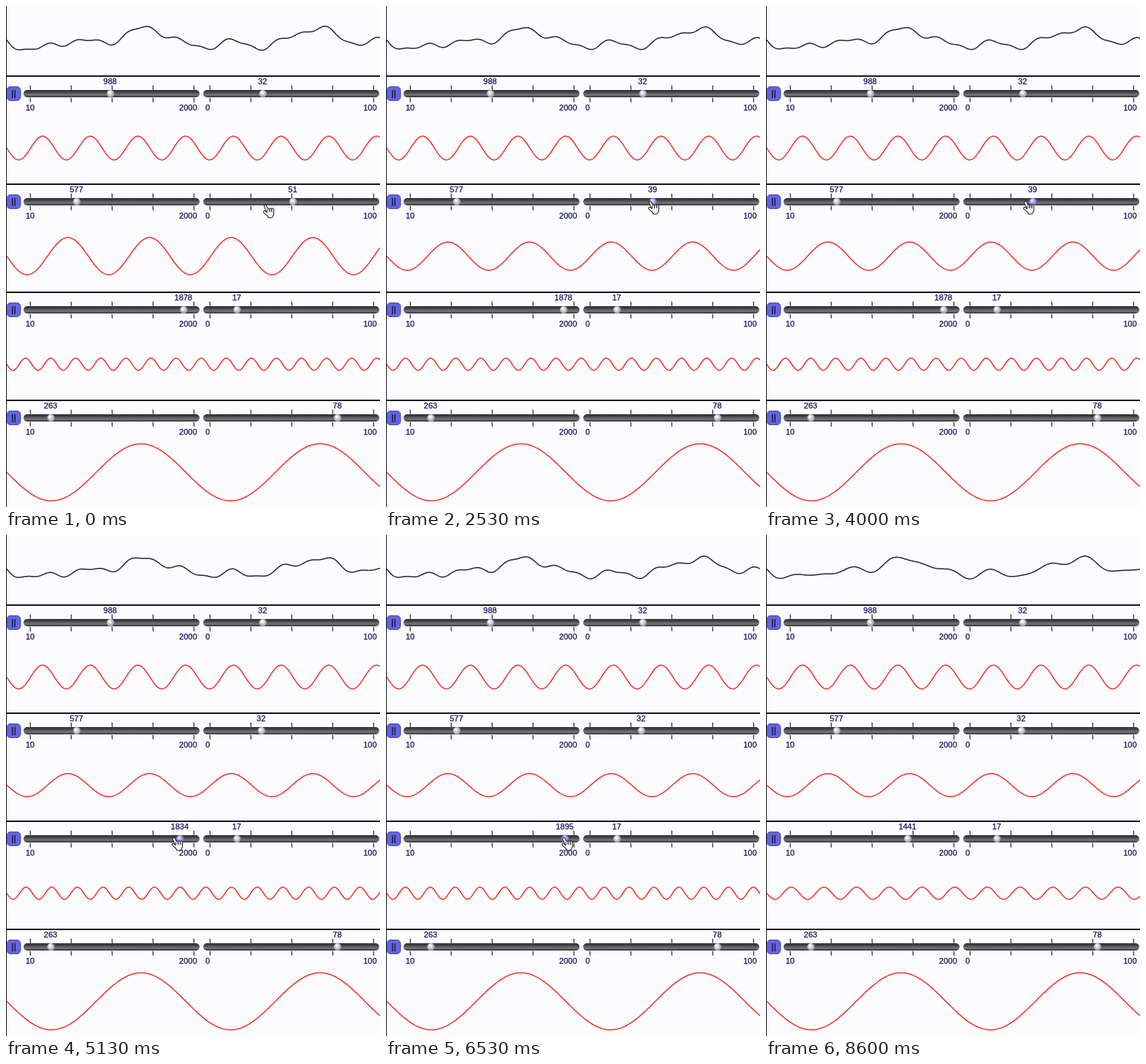
Recreate the animation shown at these times as an HTML page with a canvas. Size 512 by 686 pixels, loop 8.67 s.

```html
<!DOCTYPE html>
<html lang="en">
<head>
<meta charset="utf-8">
<title>Adding sine waves</title>
<style>
  html, body { margin: 0; width: 100%; height: 100%; overflow: hidden; background: #fcfcff; }
  canvas { display: block; width: 512px; height: 686px; }
</style>
</head>
<body>
<canvas id="stage" width="512" height="686"></canvas>
<script>
const ctx = document.getElementById('stage').getContext('2d');
const LOOP = 8670, FRAMES = 130;
const ROW_HEIGHT = 148, STEPS = 228, TRACK = 224;
const LEFT = 33, RIGHT = 279;
const KNOB_LAG = 110;
const INK = '#141418', LABEL = '#101058', WAVE = '#f03028';

const mix = (a, b, u) => a + (b - a) * u;

function ease(t, from, to) {
  const u = Math.min(1, Math.max(0, (t - from) / (to - from)));
  return u * u * (3 - 2 * u);
}

// Eased motion through turning points [time, step]
const swing = (t, ...points) => points.reduce((value, [time, next], i) =>
  i ? mix(value, next, ease(t, points[i - 1][0], time)) : next, 0);

const draggedAmplitude = t => swing(t, [1720, 116], [2900, 80], [3525, 130], [4250, 72]);
const draggedFrequency = t => swing(t, [5000, 214], [5450, 190], [6500, 216], [7830, 164]);
const knobX = (start, step) => start + step * TRACK / STEPS;

function text(label, x, y, align = 'left') {
  ctx.font = '11px "Liberation Sans", Arial, sans-serif';
  ctx.textAlign = align;
  ctx.fillStyle = ctx.strokeStyle = LABEL;
  ctx.lineWidth = 0.25;
  ctx.fillText(label, x, y);
  ctx.strokeText(label, x, y);
}

function curve(height, color) {
  ctx.beginPath();
  for (let x = 1; x <= 512; x++) ctx.lineTo(x, height(x - 1));
  ctx.strokeStyle = color;
  ctx.lineWidth = 1.5;
  ctx.stroke();
}

function pauseButton(y) {
  ctx.beginPath();
  ctx.roundRect(1, y - 9.5, 19, 19, 5);
  ctx.fillStyle = '#6464dc';
  ctx.fill();
  ctx.strokeStyle = '#4848b4';
  ctx.lineWidth = 1;
  ctx.stroke();
  ctx.fillStyle = '#18184c';
  for (const x of [8, 11.5]) ctx.fillRect(x, y - 5, 1.5, 11);
}

function shade(gradient, ...colors) {
  colors.forEach((color, i) => gradient.addColorStop(i / (colors.length - 1), color));
  ctx.fillStyle = gradient;
  ctx.fill();
}

function slider(x, y, step, low, high, pressed) {
  for (let i = 0; i < 5; i++) {
    const tick = x + i * TRACK / 4;
    for (const top of [y - 12, y + 5]) {
      ctx.fillStyle = '#b4b4b8';
      ctx.fillRect(tick - 1, top, 1, 6);
      ctx.fillStyle = '#3c3c40';
      ctx.fillRect(tick, top + 1, 1, 6);
    }
  }

  ctx.beginPath();
  ctx.roundRect(x - 9, y - 5, 241, 10, 5);
  shade(ctx.createLinearGradient(0, y - 5, 0, y + 5), '#2c2c30', '#48484c', '#76767a', '#303034');

  const knob = knobX(x, step);
  ctx.beginPath();
  ctx.arc(knob, y, 5.3, 0, 7);
  shade(ctx.createRadialGradient(knob - 1.5, y - 2, 0.5, knob, y, 5.5),
    ...(pressed ? ['#e8e8ff', '#a4a4f4', '#6464c0'] : ['#ffffff', '#cecece', '#8c8c8c']));

  text(Math.round(mix(low, high, step / STEPS)), knob - 0.5, y - 13, 'center');
  text(low, x - 6, y + 23);
  text(high, x + 228.5, y + 23, 'right');
}

// A hand built from round strokes: dark outline first, then a pale filling
function pointer(x, y) {
  ctx.save();
  ctx.translate(x, y);
  ctx.lineCap = ctx.lineJoin = 'round';
  for (const [color, grow] of [[INK, 2], ['#fafafa', 0]]) {
    ctx.strokeStyle = color;
    ctx.lineWidth = 2.2 + grow;
    ctx.stroke(new Path2D('M0 1 L4 10 M-1 9 L5 14'));
    for (let i = 0; i < 3; i++) ctx.stroke(new Path2D(`M${4 + i * 3} 5.5 V12`));
    ctx.lineWidth = 5 + grow;
    ctx.stroke(new Path2D('M5 11 H8.5 L7.5 14 H6'));
  }
  ctx.strokeStyle = INK;
  ctx.lineWidth = 0.8;
  for (let i = 0; i < 3; i++) ctx.stroke(new Path2D(`M${3 + i * 3} 5.5 V9`));
  ctx.restore();
}

// The hand leads the knob it drags, and glides from one slider to the next
function drawPointer(t) {
  const toAmplitude = ease(t, 1200, 1720), toFrequency = ease(t, 4300, 4950), leave = ease(t, 8000, 8500);
  const amplitudeX = knobX(RIGHT, draggedAmplitude(t + KNOB_LAG));
  const frequencyX = knobX(LEFT, draggedFrequency(t + KNOB_LAG));
  const x = mix(mix(mix(355, amplitudeX, toAmplitude), frequencyX, toFrequency), -30, leave);
  const y = mix(mix(mix(273, 268, ease(t, 0, 1400)), 415, toFrequency), 440, leave);
  pointer(x, y);
}

function draw(t) {
  const rows = [
    { frequency: 112, amplitude: 74 },
    { frequency: 65, amplitude: Math.round(draggedAmplitude(t)), amplitudeHeld: t > 1720 && t < 4300 },
    { frequency: Math.round(draggedFrequency(t)), amplitude: 38, frequencyHeld: t > 4950 && t < 8000 },
    { frequency: 29, amplitude: 178 }
  ];
  const waves = rows.map(({ frequency, amplitude }) => {
    const hertz = mix(10, 2000, frequency / STEPS);
    return x => amplitude * 50 / STEPS * Math.sin(2 * Math.PI * hertz * x / 64500);
  });

  ctx.fillStyle = '#fcfcff';
  ctx.fillRect(0, 0, 512, 686);
  curve(x => 46.5 + waves.reduce((sum, wave) => sum + wave(x), 0) / waves.length, '#24242a');

  rows.forEach((row, i) => {
    const top = 96 + i * ROW_HEIGHT, y = top + 24;
    ctx.fillStyle = INK;
    ctx.fillRect(0, top - 1, 512, 2);
    curve(x => top + 98.5 + waves[i](x), WAVE);
    pauseButton(y);
    slider(LEFT, y, row.frequency, 10, 2000, row.frequencyHeld);
    slider(RIGHT, y, row.amplitude, 0, 100, row.amplitudeHeld);
  });

  ctx.fillStyle = INK;
  ctx.fillRect(0, 0, 1, 686);
  drawPointer(t);
}

function tick() {
  const frame = Math.floor((performance.now() % LOOP + 7) * FRAMES / LOOP) % FRAMES;
  draw(frame * LOOP / FRAMES);
  requestAnimationFrame(tick);
}
tick();
</script>
</body>
</html>
```
